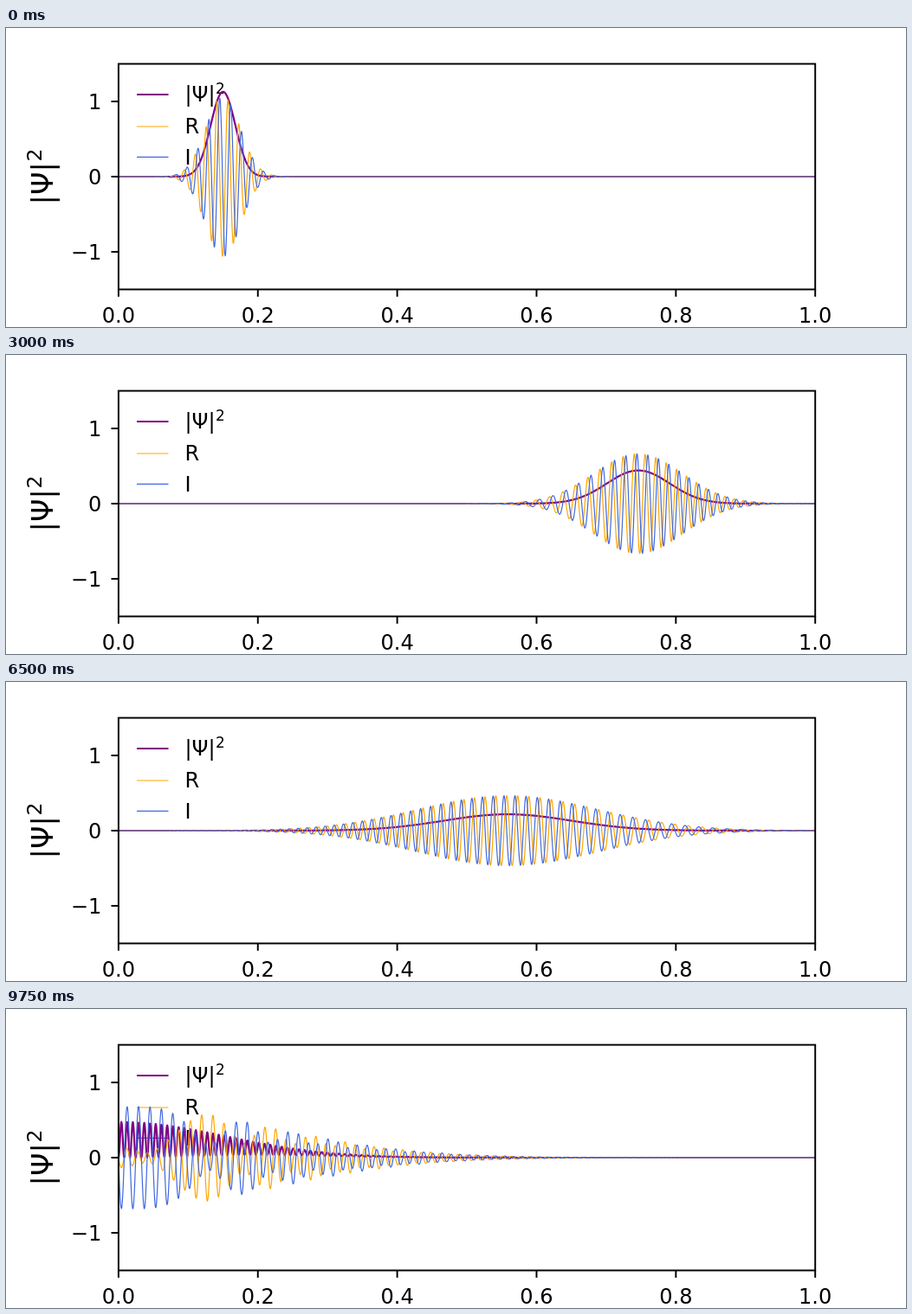
Animation, 1039 px wide and 346 px high, one loop 10000 ms. Source, as an HTML page:

```html
<!DOCTYPE html>
<html lang="en">
<head>
<meta charset="utf-8">
<title>Wave packet in a box</title>
<style>
  html, body { margin: 0; width: 100%; height: 100%; overflow: hidden; background: #fff; }
  svg { display: block; width: 1039px; height: 346px; }
  text { font-family: "DejaVu Sans", sans-serif; font-size: 24.05px; }
  .sup { font-size: 16.83px; }
  .axis { stroke: #000; stroke-width: 1.95; fill: none; }
  .curve { fill: none; stroke-linejoin: round; }
  .density { stroke: purple; stroke-width: 2.2; }
  .real { stroke: orange; stroke-width: 1.2; }
  .imag { stroke: royalblue; stroke-width: 1.2; }
</style>
</head>
<body>
<svg viewBox="0 0 1039 346">
  <defs>
    <clipPath id="box"><rect x="129.9" y="41.5" width="804.5" height="261"/></clipPath>
    <g id="psi">
      <text>|Ψ|</text>
      <text class="sup" x="35.6" y="-9">2</text>
    </g>
  </defs>
  <g id="ticks"></g>
  <use href="#psi" transform="translate(54 204.4) rotate(-90) scale(1.4)"/>

  <path class="density" d="M151 77H187.5"/>
  <path class="real" d="M151 114H187.5"/>
  <path class="imag" d="M151 149.3H187.5"/>
  <use href="#psi" x="206.5" y="85.2"/>
  <text x="206.5" y="122.4">R</text>
  <text x="206.5" y="157.5">I</text>

  <g clip-path="url(#box)">
    <path id="density" class="curve density"/>
    <path id="real" class="curve real"/>
    <path id="imag" class="curve imag"/>
  </g>
  <rect class="axis" x="129.9" y="41.5" width="804.3" height="261"/>
</svg>
<script>
const LEFT = 129.9, WIDTH = 804.3, ZERO = 172, UNIT = 87;
const STEP_MS = 250, STEPS = 40;

// Gaussian packet between hard walls, on a grid of CELLS cells
const CELLS = 2000, K0 = 400, X0 = 0.15, SIGMA = 0.025, DT = 1.25e-4;
const AMP = Math.sqrt(1 / (20 * SIGMA * Math.sqrt(Math.PI)));

const byId = id => document.getElementById(id);
const px = x => LEFT + WIDTH * x;
const py = y => ZERO - UNIT * y;

function drawTicks() {
  let out = '';
  const label = (x, y, anchor, s) =>
    `<text x="${x}" y="${y}" text-anchor="${anchor}">${s}</text>`;
  for (let i = 0; i <= 5; i++) {
    const x = px(i / 5);
    out += `<path class="axis" d="M${x} 302.5v8.4"/>` +
      label(x, 341, 'middle', (i / 5).toFixed(1));
  }
  for (let v = -1; v <= 1; v++) {
    const y = py(v);
    out += `<path class="axis" d="M${LEFT} ${y}h-8.4"/>` +
      label(110.3, y + 8.9, 'end', String(v).replace('-', '−'));
  }
  byId('ticks').innerHTML = out;
}

const sine = Float64Array.from({ length: 2 * CELLS }, (_, i) => Math.sin(Math.PI * i / CELLS));

// Standing waves of the box: weight, starting phase and energy
const modes = [];
for (let n = 60; n <= 195; n++) {
  const p = n * Math.PI, d = K0 - p;
  modes.push({
    n,
    weight: AMP * SIGMA * Math.sqrt(2 * Math.PI) * Math.exp(-((SIGMA * d) ** 2) / 2),
    phase: d * X0 + Math.PI / 2,
    energy: (1 - Math.cos(p / CELLS)) * CELLS * CELLS
  });
}

function wave(t) {
  const re = new Float64Array(CELLS + 1), im = new Float64Array(CELLS + 1);
  for (const { n, weight, phase, energy } of modes) {
    const a = phase - energy * t;
    const c = weight * Math.cos(a), s = weight * Math.sin(a);
    for (let j = 0; j <= CELLS; j++) {
      const v = sine[(n * j) % (2 * CELLS)];
      re[j] += c * v;
      im[j] += s * v;
    }
  }
  return { re, im };
}

function plot(id, values) {
  const pts = Array.from(values, (v, j) => px(j / CELLS).toFixed(2) + ' ' + py(v).toFixed(2));
  byId(id).setAttribute('d', 'M' + pts.join('L'));
}

let shown = -1;
function tick() {
  const step = Math.floor(performance.now() / STEP_MS) % STEPS;
  if (step !== shown) {
    shown = step;
    const { re, im } = wave(step * DT);
    plot('density', re.map((r, j) => r * r + im[j] * im[j]));
    plot('real', re);
    plot('imag', im);
  }
  requestAnimationFrame(tick);
}

drawTicks();
tick();
</script>
</body>
</html>
```
